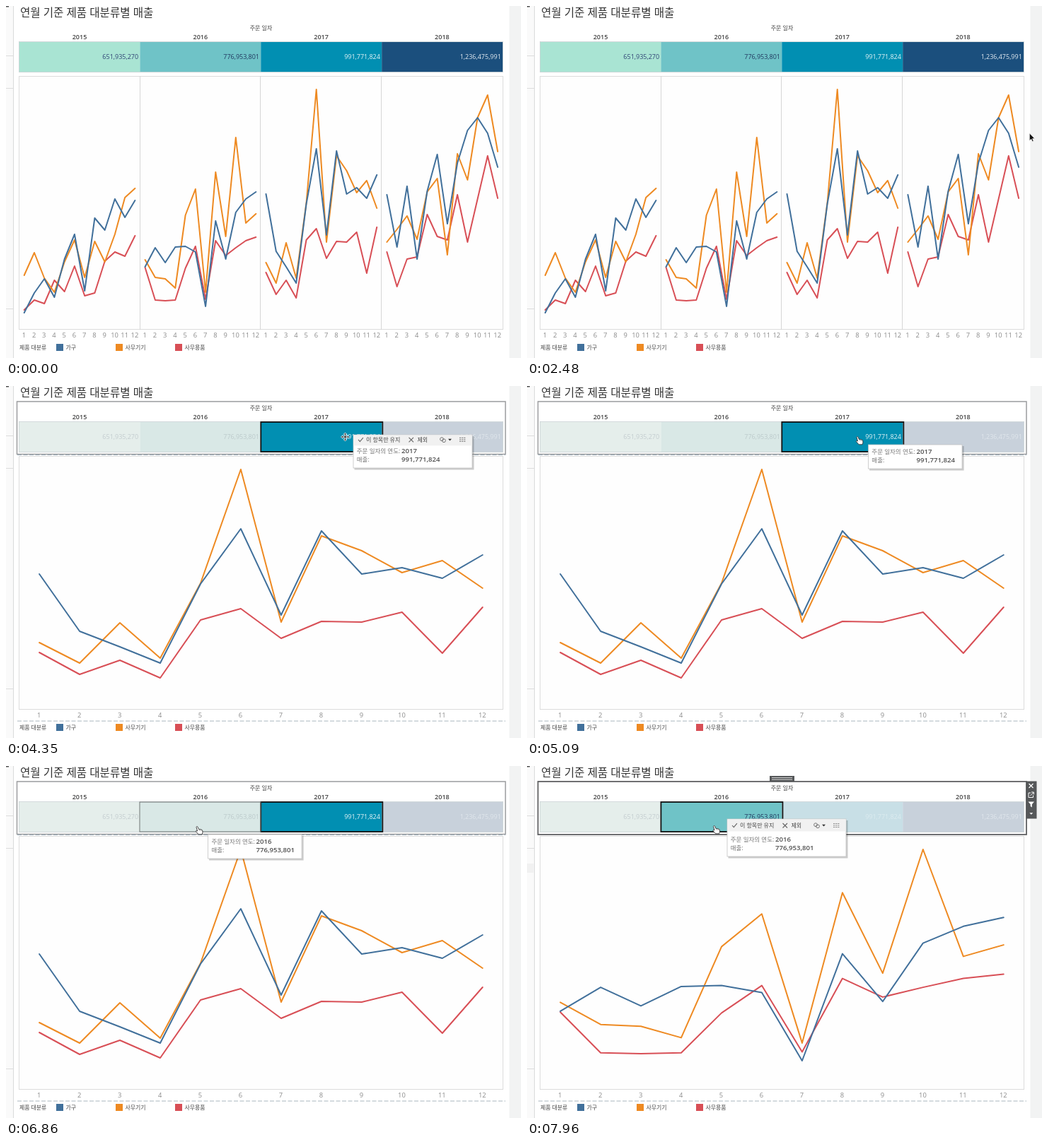
An HTML page that plays this animation: 728x498 px, repeating every 8000 ms.

```html
<!DOCTYPE html>
<html lang="ko">
<head>
<meta charset="utf-8">
<title>매출 대시보드</title>
<style>
  html, body { margin: 0; width: 100%; height: 100%; overflow: hidden; background: #fff; }
  svg { display: block; width: 728px; height: 498px; }
  text { font-family: 'Open Sans', 'Noto Sans CJK KR', 'Noto Sans CJK JP', sans-serif; }
</style>
</head>
<body>
<svg id="stage" viewBox="0 0 728 498" xmlns="http://www.w3.org/2000/svg"></svg>
<script>
const LOOP = 8000, LEFT = 18.6, WIDTH = 683.6, BASE = 457;
const COLORS = { red: '#d84f56', orange: '#ee8a22', blue: '#41709b' };

// Monthly heights on the stage, one row per product group.
const YEARS = [
  { name: 2015, sum: '651,935,270', fill: '#a9e4d3', dim: '#e5eeeb', ink: '#2f4374', dimInk: '#c3cccf',
    blue: [434, 406, 386, 412, 358, 323, 403, 300, 317, 273, 299, 275],
    orange: [381, 349, 385, 405, 362, 331, 384, 333, 362, 323, 271, 258],
    red: [430, 416, 421, 388, 404, 368, 410, 406, 361, 348, 354, 325] },
  { name: 2016, sum: '776,953,801', fill: '#6fc3c7', dim: '#d9e8e6', ink: '#21385f', dimInk: '#bccacb',
    blue: [369, 342, 363, 341, 340, 348, 425, 304, 358, 292, 273, 263],
    orange: [359, 384, 386, 399, 296, 259, 405, 235, 326, 186, 307, 294],
    red: [370, 416, 417, 416, 371, 340, 415, 332, 353, 342, 332, 327] },
  { name: 2017, sum: '991,771,824', fill: '#018fb2', dim: '#c8dfe6', ink: '#e6f4f7', dimInk: '#dcebef',
    blue: [266, 347, 369, 392, 280, 202, 324, 205, 266, 257, 272, 239],
    orange: [363, 392, 335, 385, 279, 118, 334, 212, 233, 264, 247, 286],
    red: [377, 408, 388, 413, 331, 315, 357, 333, 334, 320, 378, 313] },
  { name: 2018, sum: '1,236,475,991', fill: '#1b4f7d', dim: '#c8d1db', ink: '#e4ebf2', dimInk: '#e0e6ec',
    blue: [267, 341, 255, 358, 262, 210, 308, 222, 176, 158, 180, 228],
    orange: [334, 316, 297, 330, 263, 244, 352, 209, 246, 158, 126, 206],
    red: [348, 397, 358, 355, 295, 326, 331, 267, 334, 273, 212, 272] }
];

// [time, x, y] of the pointer centre
const POINTER = [
  [2480, 714, 186], [2860, 610, 124], [3240, 490, 82], [3370, 490, 82], [3700, 482.5, 76.5],
  [3900, 482.5, 76.5], [4000, 479.5, 72], [4700, 479.5, 72], [4990, 470, 77], [5090, 470, 77],
  [5740, 447.3, 89.3], [5980, 447.3, 89.3], [6740, 273, 91], [6960, 273, 91], [7300, 267.5, 90]
];
// [time, how far the tooltip's command bar is open]
const BAR_A = [[4230, 0], [4340, .68], [4440, .68], [4550, 1]];
const BAR_B = [[7400, 0], [7630, 1]];

const PICK_A = 3900, PICK_B = 7180, LAG = 100;

const rect = (x, y, w, h, fill, more = '') =>
  `<rect x="${x}" y="${y}" width="${w}" height="${h}" fill="${fill}" ${more}/>`;
const path = (d, stroke, w = 1, more = '') =>
  `<path d="${d}" fill="none" stroke="${stroke}" stroke-width="${w}" ${more}/>`;
const text = (s, x, y, size, fill, anchor = 'start', weight = 400) =>
  `<text x="${x}" y="${y}" font-size="${size}" fill="${fill}" text-anchor="${anchor}" font-weight="${weight}">${s}</text>`;

function track(keys, t) {
  if (t <= keys[0][0]) return keys[0].slice(1);
  for (let i = 1; i < keys.length; i++) {
    const a = keys[i - 1], b = keys[i];
    if (t < b[0]) {
      const p = (t - a[0]) / (b[0] - a[0]);
      return a.slice(1).map((v, k) => v + (b[k + 1] - v) * p);
    }
  }
  return keys[keys.length - 1].slice(1);
}

function page() {
  let s = rect(0, 0, 728, 498, '#fff') + rect(0, 0, 10, 498, '#fafafa') + rect(711.5, 0, 16.5, 498, '#f2f3f3');
  s += path('M10.5 0V498', '#d9dadb') + path('M0 70.5H10M0 116.5H10M0 428.5H10', '#dcdcdc');
  s += rect(0, 0, 4, 1.5, '#555');
  s += text('연월 기준 제품 대분류별 매출', 20, 14.5, 15.6, '#333');
  s += text('주문 일자', 360.5, 34, 8, '#444', 'middle');
  YEARS.forEach((y, i) => s += text(y.name, 104 + i * 170.8, 47.3, 9, '#444', 'middle', 600));
  s += text('제품 대분류', 19, 486, 7.9, '#444');
  [['blue', '가구', 71], ['orange', '사무기기', 155], ['red', '사무용품', 239]].forEach(([c, label, x]) => {
    s += rect(x, 478, 10, 10, COLORS[c]) + text(label, x + 13.5, 486, 7.9, '#444');
  });
  return s;
}

function chart(years) {
  const pane = WIDTH / years.length, step = pane / 12;
  const grow = years.length === 1 && years[0].name === 2016 ? 1.251 : 1;
  let s = '';
  years.forEach((year, p) => {
    const left = LEFT + p * pane;
    const at = i => left + (i + .5) * step;
    if (p) s += path(`M${Math.round(left) - .5} 99V458`, '#d6d6d6');
    for (const c of ['red', 'orange', 'blue']) {
      const pts = year[c].map((y, i) => `${at(i).toFixed(1)} ${(BASE - (BASE - y) * grow).toFixed(1)}`);
      s += path('M' + pts.join('L'), COLORS[c], 2, 'stroke-linejoin="round" stroke-linecap="round"');
    }
    for (let i = 0; i < 12; i++) s += text(i + 1, at(i) - .4, 468.6, 9.4, '#8a8a8a', 'middle');
  });
  return rect(18.5, 99.5, 684, 358, '#fefefe', 'stroke="#dcdcdc"') + s;
}

function header(pick) {
  let s = '';
  const cell = i => 18.5 + i * 170.9;
  YEARS.forEach((y, i) => {
    const on = !pick || y.name === pick;
    s += rect(cell(i), 51, 171, 42.5, on ? y.fill : y.dim);
    s += text(y.sum, cell(i) + 168.6, 75.2, 9, on ? y.ink : y.dimInk, 'end');
  });
  s += rect(18.5, 50.5, 684, 43, 'none', 'stroke="#c9d2d4" stroke-width=".8"');
  if (pick) s += rect(cell(pick - 2015), 51, 172, 42, 'none', 'stroke="#111" stroke-width="1.8"');
  return s;
}

function frame(active) {
  const dash = 'stroke-dasharray="6 2.5"';
  let s = path('M16 474H706', '#a9b6be', 1, dash);
  if (!active) {
    return s + rect(15.5, 22, 690.5, 74.5, 'none', 'stroke="#9b9c9e" stroke-width="1.5"') +
      path('M16 97.5H706', '#9fb0bc', 1, dash);
  }
  s += rect(0, 138, 9.5, 13, '#f1f1f1');
  s += rect(15.5, 22, 690.5, 75, 'none', 'stroke="#606163" stroke-width="1.8"');
  s += rect(343, 14, 35, 8, '#555759') + path('M346 16.6H375M346 19.2H375', '#d8d8d8');
  s += rect(705.5, 21.5, 15, 53, '#555759');
  s += path('M709.5 25L715.5 31M715.5 25L709.5 31', '#fff', 1.2);
  s += path('M712 38H709V44.5H715.5V41.5M711.5 42L716 37.5M713 37H716.3V40.3', '#fff');
  s += '<path d="M708.5 50.5H717L713.8 54.3V58.5L711.7 57V54.3ZM710.3 66.2H715.3L712.8 68.8Z" fill="#fff"/>';
  return s;
}

// x: left edge, y: middle of the first text row, open: command bar, 0 to 1
function tip(year, x, y, bar, open) {
  const top = y - 10 - 19 * open, w = bar ? 168 : 132.5, h = y + 24 - top;
  let s = rect(x + 1.5, top + 2, w + 1, h + .5, '#000', 'opacity=".2"') + rect(x, top, w, h, '#fff', 'stroke="#c4c4c4" stroke-width=".8"');
  if (open > .3) {
    const c = y - 7.6 - 12.4 * open;
    s += rect(x + .4, top + .4, w - .8, Math.max(0, c + 8 - top), '#f1f1f1');
    s += path(`M${x + 7} ${c}l2.3 2.6 4.6-5.4`, '#666', 1.1);
    s += text('이 항목만 유지', x + 18, c + 3, 8, '#444');
    s += path(`M${x + 78.5} ${c - 3}l6.5 6.5m0-6.5l-6.5 6.5`, '#666', 1.1);
    s += text('제외', x + 90.5, c + 3, 8, '#444');
    s += `<circle cx="${x + 125}" cy="${c - .8}" r="2.4" fill="none" stroke="#777"/>`;
    s += `<circle cx="${x + 128}" cy="${c + 1.3}" r="2.4" fill="none" stroke="#777"/>`;
    s += `<path d="M${x + 134} ${c - 1.2}h5l-2.5 2.8z" fill="#333"/>`;
    s += path(`M${x + 150} ${c - 2.5}h8.5m-8.5 2.5h8.5m-8.5 2.5h8.5`, '#8a8a8a', 1.2, 'stroke-dasharray="2.2 .9"');
  }
  const tx = x + 4.8, vx = x + 68;
  s += text('주문 일자의 연도:', tx, y + 3.2, 8.5, '#777') + text(year.name, vx, y + 3.4, 9.6, '#505050', 'start', 600);
  s += text('매출:', tx, y + 15.2, 8.5, '#777') + text(year.sum, vx, y + 15.4, 9.6, '#505050', 'start', 600);
  return s;
}

const ICONS = {
  arrow: '<path d="M-3.5-6V4.8L-1 2.6.7 6.2 2.5 5.4.9 1.9H4.2Z" fill="#111" stroke="#fff" stroke-width=".8"/>',
  move: '<path d="M0-6L2.2-3.6H.9V-.9H3.6V-2.2L6 0 3.6 2.2V.9H.9V3.6H2.2L0 6-2.2 3.6H-.9V.9H-3.6V2.2L-6 0-3.6-2.2V-.9H-.9V-3.6H-2.2Z" fill="#222" stroke="#fff" stroke-width=".9"/>',
  hand: '<path d="M-4-4.6C-3.6-5.8-2.3-5.7-1.9-4.7L-.6-1.6 2.6-1.2Q4.7-.8 4.9 1V3.4L4 5.8H-.8L-4.5 1.7Q-4.6.2-3.2.5L-2.4 1.1Z" fill="#fff" stroke="#333" stroke-width=".9"/><path d="M.6-1.2V1M2.6-.9V1.2" stroke="#777" stroke-width=".6"/>'
};

const stage = document.getElementById('stage');
const layer = () => stage.appendChild(document.createElementNS('http://www.w3.org/2000/svg', 'g'));
const layers = { page: layer(), chart: layer(), header: layer(), frame: layer(), hover: layer(), tip: layer(), pointer: layer() };
const shown = {};

function put(name, key, make) {
  if (shown[name] === key) return;
  shown[name] = key;
  layers[name].innerHTML = make();
}

const picked = t => t < PICK_A ? 0 : t < PICK_B ? 2017 : 2016;

function tipAt(t, x, y, under) {
  if (t < 4110 || (t >= PICK_B && t < 7400)) return '';
  if (t < 4700) return tip(YEARS[2], 491, 92, true, track(BAR_A, t)[0]);
  if (t < PICK_B) return tip(under, x + 12.6, y + 16, false, 0);
  return tip(YEARS[1], 283, 104, true, track(BAR_B, t)[0]);
}

function draw(t) {
  const pick = picked(t), view = picked(t - LAG);
  const [x, y] = track(POINTER, t);
  const under = YEARS[x < 360 ? 1 : 2];
  put('page', 'page', page);
  put('chart', view, () => chart(view ? [YEARS[view - 2015]] : YEARS));
  put('header', pick, () => header(pick));
  put('frame', pick, () => pick ? frame(pick === 2016) : '');
  const hover = pick === 2017 && under.name === 2016;
  put('hover', hover, () => hover ? rect(189, 51, 171, 42, 'none', 'stroke="#6d7273"') : '');
  const box = tipAt(t, x, y, under);
  put('tip', box, () => box);
  const icon = t < 2480 ? '' : t < PICK_A ? 'arrow' : t < 4700 ? 'move' : 'hand';
  put('pointer', icon, () => ICONS[icon] || '');
  layers.pointer.setAttribute('transform', `translate(${x.toFixed(2)} ${y.toFixed(2)})`);
}

const start = performance.now();
function tick() {
  draw((performance.now() - start) % LOOP);
  requestAnimationFrame(tick);
}
tick();
</script>
</body>
</html>
```
